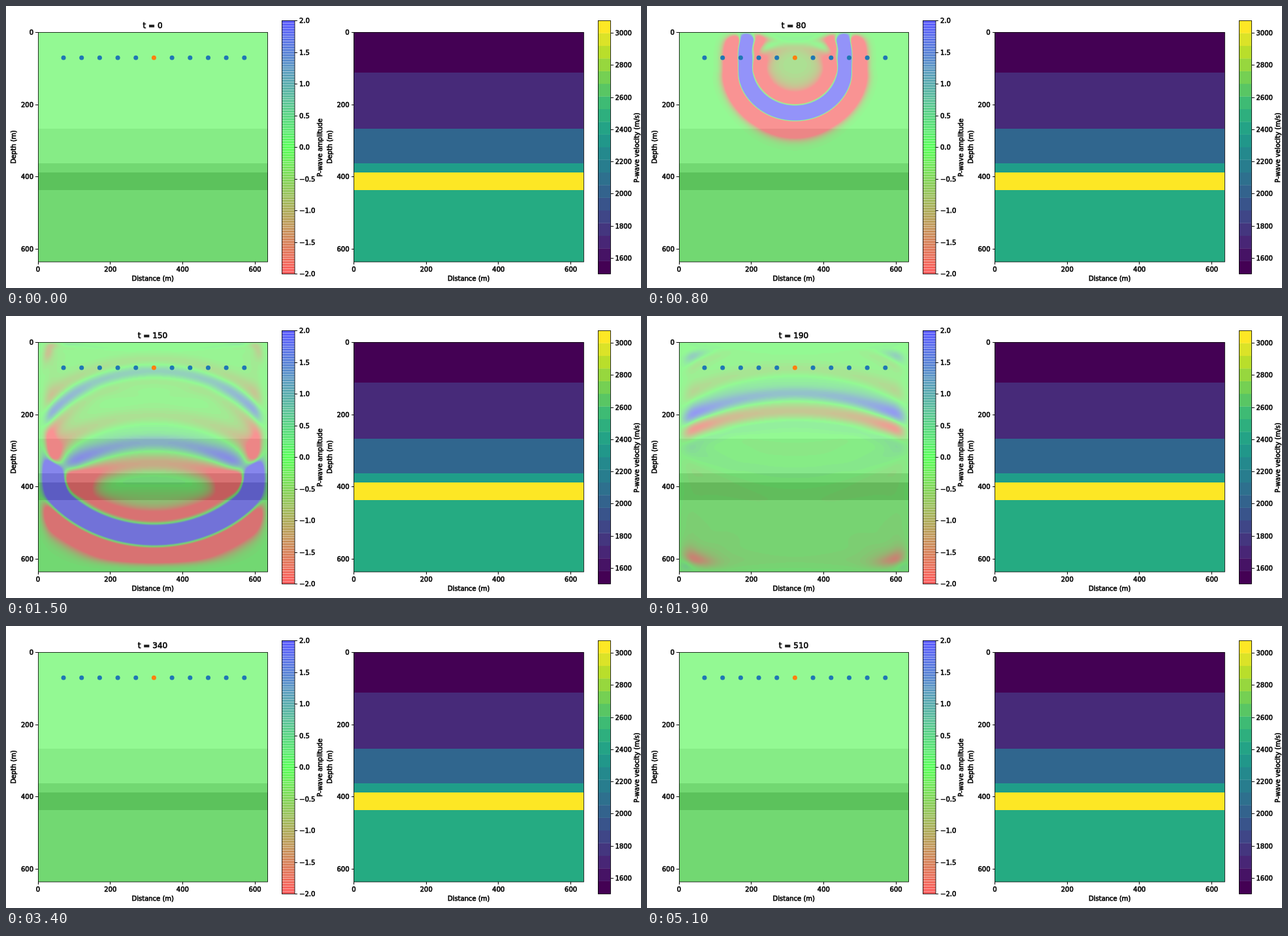
Recreate the animation shown at these times as an HTML page with a canvas. Size 972 px wide and 432 px high, loop 5.2 s.

```html
<!DOCTYPE html>
<html lang="en">
<head>
<meta charset="utf-8">
<title>Wave propagation in a layered medium</title>
<style>
html, body { margin: 0; width: 100%; height: 100%; overflow: hidden; background: #fff; }
canvas { display: block; }
</style>
</head>
<body>
<canvas id="stage" width="972" height="432"></canvas>
<script>
const ctx = document.getElementById('stage').getContext('2d');

// Layers: bottom depth (m), velocity (m/s), grey level, bottom edge (px), colour
const LAYERS = [
  [112, 1500, 245, 102, '#440154'],
  [267, 1700, 245, 188, '#472a79'],
  [363, 2000, 223, 241, '#30668e'],
  [388, 2350, 190, 255, '#1f9e89'],
  [439, 3076, 153, 282, '#fde725'],
  [999, 2450, 190, 392, '#25ab82']
];
const FRAMES = 52, FRAME_MS = 100;
const N = 128, DX = 5, DT = 0.001, STEPS = 20, PML = 10;
const FREQUENCY = 19.3, DELAY = 0.06, PEAK = 21;
const LEFT = 49, RIGHT = 532.5, TOP = 40, SIZE = 351.5, SCALE = SIZE / 635;

// Acoustic finite differences on a staggered grid with a split absorbing layer
function simulate() {
  const grid = () => new Float32Array(N * N);
  const p = grid(), px = grid(), pz = grid(), vx = grid(), vz = grid();
  const peak = 1.5 * 3076 / (PML * DX) * Math.log(1000);
  const decay = pos => {
    const d = Math.max(0, PML - Math.min(pos, N - 1 - pos)) / PML;
    return Math.exp(-peak * d * d * DT);
  };
  const full = Float32Array.from({ length: N }, (_, i) => decay(i));
  const half = Float32Array.from({ length: N }, (_, i) => decay(i + 0.5));
  const stiffness = Float32Array.from({ length: N }, (_, z) =>
    LAYERS.find(layer => z * DX < layer[0])[1] ** 2 * DT / DX);
  const source = 14 * N + 64, width = (Math.PI * FREQUENCY) ** 2;
  const frames = [p.slice()];

  for (let step = 1; step < FRAMES * STEPS; step++) {
    for (let z = 0; z < N - 1; z++)
      for (let x = 0, k = z * N; x < N - 1; x++, k++) {
        vx[k] = half[x] * vx[k] - DT / DX * (p[k + 1] - p[k]);
        vz[k] = half[z] * vz[k] - DT / DX * (p[k + N] - p[k]);
      }
    for (let z = 1; z < N - 1; z++)
      for (let x = 1, k = z * N + 1; x < N - 1; x++, k++) {
        px[k] = full[x] * px[k] - stiffness[z] * (vx[k] - vx[k - 1]);
        pz[k] = full[z] * pz[k] - stiffness[z] * (vz[k] - vz[k - N]);
        p[k] = px[k] + pz[k];
      }
    const tau = step * DT - DELAY;
    const push = tau * Math.exp(-width * tau * tau);
    px[source] += push / 2;
    pz[source] += push / 2;
    p[source] += push;
    if (step % STEPS === 0) frames.push(p.slice());
  }
  const gain = PEAK / frames[8].reduce((m, v) => Math.max(m, Math.abs(v)), 0);
  return frames.map(f => f.map(v => v * gain));
}

// Red - green - blue scale for -2..2, each channel 0..1
function amplitudeColour(v) {
  const s = Math.max(-1, Math.min(1, v / 2));
  return [Math.max(0, -s), 1 - Math.abs(s), Math.max(0, s)];
}

const VIRIDIS = [0x440154, 0x482878, 0x3e4989, 0x31688e, 0x26828e,
  0x1f9e89, 0x35b779, 0x6ece58, 0xb5de2b, 0xfde725];
function viridis(s) {
  const i = Math.min(8, Math.floor(s * 9)), f = s * 9 - i;
  const mix = [16, 8, 0].map(b =>
    Math.round((VIRIDIS[i] >> b & 255) * (1 - f) + (VIRIDIS[i + 1] >> b & 255) * f));
  return `rgb(${mix})`;
}

function text(str, x, y, align = 'center', size = 10) {
  ctx.font = `${size}px "DejaVu Sans", sans-serif`;
  ctx.textAlign = align;
  ctx.fillStyle = ctx.strokeStyle = '#000';
  ctx.lineWidth = 0.6;
  ctx.fillText(str, x, y);
  ctx.strokeText(str, x, y);
}

function vertical(str, x, y) {
  ctx.save();
  ctx.translate(x, y);
  ctx.rotate(-Math.PI / 2);
  text(str, 0, 0);
  ctx.restore();
}

function box(x, y, w, h) {
  ctx.strokeStyle = '#000';
  ctx.lineWidth = 0.8;
  ctx.strokeRect(x, y, w, h);
}

function tick(x, y, dx, dy) {
  ctx.fillStyle = '#000';
  ctx.fillRect(Math.round(x), Math.round(y), dx, dy);
}

function axes(x0) {
  const left = Math.floor(x0) + 0.5;
  box(left, TOP + 0.5, Math.floor(x0 + SIZE) + 0.5 - left, 351.5);
  for (const m of [0, 200, 400, 600]) {
    const d = m * SCALE;
    tick(x0 + d - 0.5, 392, 1, 4);
    text(m, x0 + d, 407);
    tick(x0 - 4, TOP + d, 4, 1);
    text(m, x0 - 7, TOP + d + 4, 'right');
  }
  text('Distance (m)', x0 + SIZE / 2, 421);
  vertical('Depth (m)', x0 - 34, 216);
}

function colourbar(x, w, bands, colour, ticks, toY, label, labelX) {
  const h = 388 / bands;
  for (let i = 0; i < bands; i++) {
    ctx.fillStyle = colour(i / (bands - 1));
    ctx.fillRect(x, 410 - (i + 1) * h, w, h + 0.3);
  }
  if (bands > 50) {
    ctx.fillStyle = 'rgba(255,255,255,0.38)';
    for (let i = 1; i < bands; i++) ctx.fillRect(x, Math.round(410 - i * h), w, 1);
  }
  box(x + 0.5, 22.5, w - 0.5, 388);
  for (const [value, str] of ticks) {
    const y = toY(value);
    tick(x + w, y, 4, 1);
    text(str, x + w + 7, y + 4, 'left');
  }
  vertical(label, labelX, 217);
}

function drawStatic() {
  ctx.fillStyle = '#fff';
  ctx.fillRect(0, 0, 972, 432);
  let y = TOP;
  for (const [, , , bottom, colour] of LAYERS) {
    ctx.fillStyle = colour;
    ctx.fillRect(532, y, 352, bottom - y);
    y = bottom;
  }
  axes(RIGHT);
  const amplitudes = Array.from({ length: 9 }, (_, i) => {
    const v = 2 - i / 2;
    return [v, (v < 0 ? '\u2212' : '') + Math.abs(v).toFixed(1)];
  });
  const speeds = Array.from({ length: 8 }, (_, i) => [1600 + i * 200, 1600 + i * 200]);
  colourbar(422, 20, 99,
    s => `rgb(${amplitudeColour(s * 4 - 2).map(c => Math.round(92 + 163 * c))})`,
    amplitudes, v => 22 + (2 - v) * 97, 'P-wave amplitude', 484);
  colourbar(906, 19.5, 20, viridis,
    speeds, v => 386 - (v - 1600) * 0.2464, 'P-wave velocity (m/s)', 969);
}

const image = ctx.createImageData(352, 352);
function drawField(field) {
  const level = 4 / 41, cell = (N - 1) / SIZE;
  for (let y = 0, o = 0; y < 352; y++) {
    const gz = Math.min(N - 1.001, y * cell), z = Math.floor(gz), fz = gz - z;
    const grey = 0.6 * LAYERS.find(layer => y + TOP < layer[3])[2];
    for (let x = 0; x < 352; x++, o += 4) {
      const gx = Math.min(N - 1.001, x * cell), i = Math.floor(gx), fx = gx - i;
      const k = z * N + i;
      const v = (field[k] * (1 - fx) + field[k + 1] * fx) * (1 - fz)
        + (field[k + N] * (1 - fx) + field[k + N + 1] * fx) * fz;
      const [r, g, b] = amplitudeColour(Math.round(v / level) * level);
      image.data[o] = grey + 102 * r;
      image.data[o + 1] = grey + 102 * g;
      image.data[o + 2] = grey + 102 * b;
      image.data[o + 3] = 255;
    }
  }
  ctx.putImageData(image, LEFT, TOP);
}

function drawFrame(n) {
  drawStatic();
  drawField(fields[n]);
  for (let m = 70; m <= 570; m += 50) {
    ctx.fillStyle = m === 320 ? '#ff7f0e' : '#1f77b4';
    ctx.beginPath();
    ctx.arc(LEFT + 0.3 + m * SCALE, TOP + 0.5 + 70 * SCALE, 3.5, 0, 7);
    ctx.fill();
  }
  axes(LEFT);
  text(`t = ${n * 10}`, 224.5, 34, 'center', 12);
}

const fields = simulate();
const start = performance.now();
let shown = -1;
function loop() {
  const n = Math.floor((performance.now() - start) / FRAME_MS) % FRAMES;
  if (n !== shown) drawFrame(shown = n);
  requestAnimationFrame(loop);
}
loop();
</script>
</body>
</html>
```
